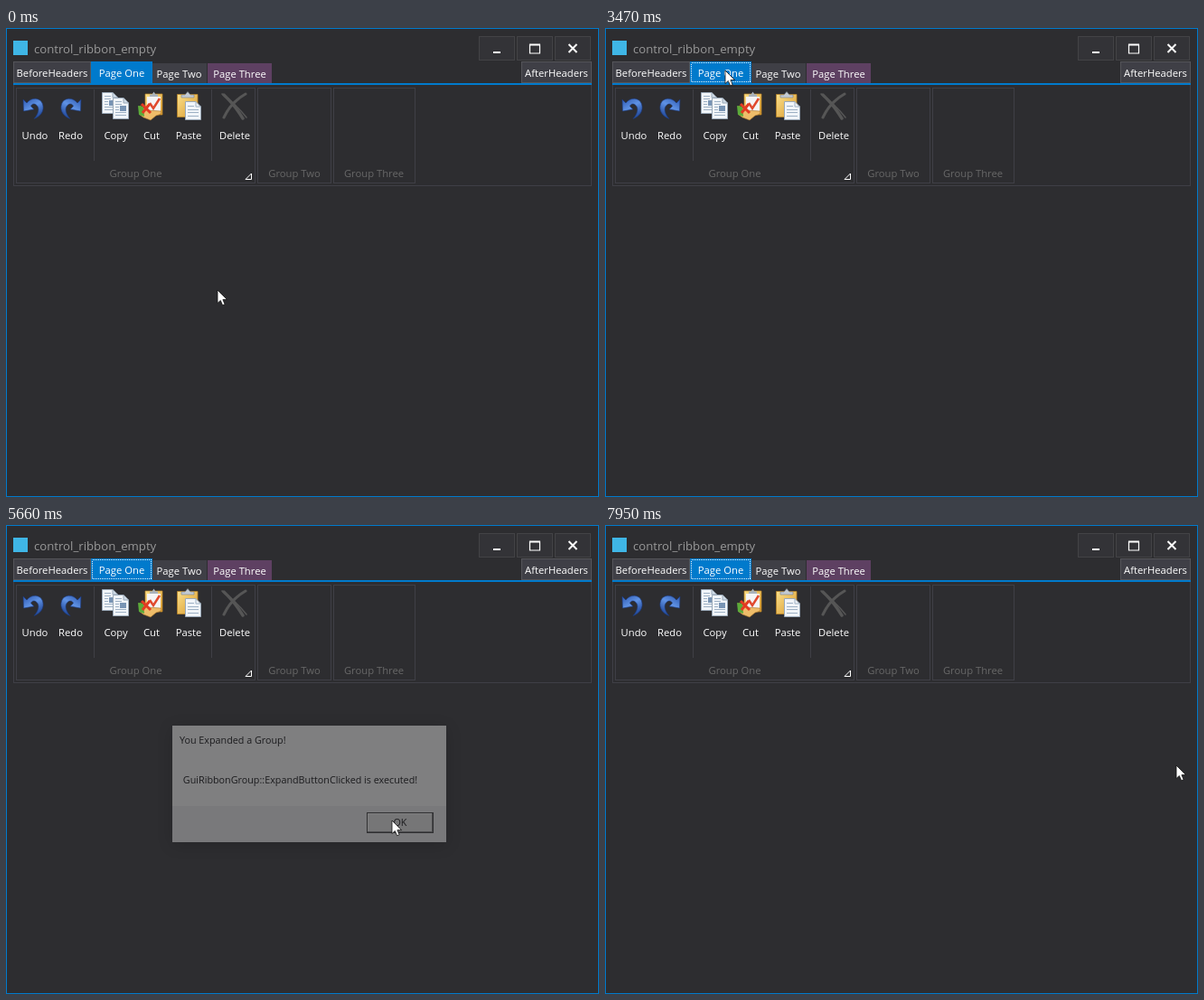
Recreate the animation shown at these times as an HTML page. Size 656 by 519 pixels, loop 7.99 s.

```html
<!DOCTYPE html>
<html lang="en">
<head>
<meta charset="utf-8">
<title>Ribbon demo</title>
<style>
html, body { margin: 0; width: 100%; height: 100%; overflow: hidden; background: #2d2d30; }
svg { display: block; font: 11.25px "Open Sans", "Noto Sans", sans-serif; }
rect { shape-rendering: crispEdges; }
text { fill: #fff; }
.mid { text-anchor: middle; }
.frame { fill: none; stroke: #007acc; }
.box { fill: none; stroke: #3f3f46; }
.btn { fill: #3f3f46; stroke: #55555a; }
.sys { fill: #333337; stroke: #434346; }
.glyph { fill: none; stroke: #fff; stroke-width: 2; }
.dots { fill: none; stroke: #e8f2fa; stroke-dasharray: 1 1; }
.title { fill: #999; font-size: 13.2px; }
.group { fill: #686868; }
.hot { fill: #54545c; }
.press { fill: #007acc; }
.cross { fill: none; stroke: #565656; stroke-linecap: round; }
.off .frame { stroke: #3f3f46; }
.off .btn, .off .sys { fill: #2d2d30; stroke: #3f3f46; }
.off .label { fill: #848484; }
.off .group { fill: #999; }
.off .glyph { stroke: #999; }
.off .icons { filter: grayscale(1) brightness(1.5) opacity(.85); }
.off .cross { stroke: #909090; }
#dialog { transform-origin: 335.5px 287px; }
#dialog text { fill: #000; font-size: 11px; }
#shade { filter: drop-shadow(0 3px 9px rgba(0, 0, 0, .4)); }
</style>
</head>
<body>
<svg id="stage" width="656" height="519" viewBox="0 0 656 519">
  <defs>
    <linearGradient id="blue" x1="0" y1="0" x2=".6" y2="1">
      <stop offset="0" stop-color="#2b55ad"/><stop offset=".5" stop-color="#5f92e4"/><stop offset="1" stop-color="#234a9c"/>
    </linearGradient>
    <linearGradient id="gold" x1="0" y1="0" x2="1" y2="1">
      <stop offset="0" stop-color="#fbe08a"/><stop offset="1" stop-color="#d99a2e"/>
    </linearGradient>
    <path id="turn" fill="url(#blue)" stroke="#1c3a7c" stroke-width=".6"
      d="M1 4L5 8C10 1 20 2 22.5 9C25 17 20 23 13 25.500C18 20 19.500 14 16 10.500C13 8 10.500 9 9.500 11.500L13 15L1.500 17Z"/>
    <g id="page">
      <path d="M.5 .5H12L17.500 6V23.500H.5Z" fill="#f1f5f9" stroke="#9aa9b8"/>
      <path d="M12 .5V6H17.500" fill="#cfdbe6" stroke="#9aa9b8"/>
      <path d="M3 4.500H10M3 7.500H10M3 10.500H7M3 13.500H7M3 16.500H15M3 19.500H15" stroke="#9db0c4"/>
      <rect x="8" y="9" width="7" height="6" fill="#7894b4"/>
    </g>
  </defs>

  <rect width="656" height="519" fill="#2d2d30"/>
  <rect class="frame" x=".5" y=".5" width="655" height="518"/>
  <rect x="8" y="14" width="16" height="16" fill="#3fb6e6"/>
  <text class="title" x="31" y="28">control_ribbon_empty</text>
  <rect class="sys" x="523.5" y="9.5" width="39" height="26"/>
  <rect class="sys" x="565.5" y="9.5" width="39" height="26"/>
  <rect class="sys" x="607.5" y="9.5" width="39" height="26"/>
  <path class="glyph" d="M539 27H547"/>
  <path class="glyph" style="stroke-width:1.200" d="M579.500 18V28H590.500V18M579 19H591M579 18H591"/>
  <path class="glyph" d="M622.500 18L631.500 27M631.500 18L622.500 27"/>

  <rect class="box" x="8.5" y="61.5" width="639" height="113"/>
  <g id="content">
    <rect class="box" x="11.5" y="66.5" width="264" height="105"/>
    <rect class="box" x="278.5" y="66.5" width="81" height="105"/>
    <rect class="box" x="362.5" y="66.5" width="90" height="105"/>
    <path class="box" d="M97.500 68V147M227.500 68V147"/>
    <text class="group mid" x="143.5" y="165">Group One</text>
    <text class="group mid" x="319" y="165">Group Two</text>
    <text class="group mid" x="407" y="165">Group Three</text>
    <g id="tools"></g>
    <path class="glyph" style="stroke-width:1" d="M265 167.500H271.500V161Z"/>
    <g class="icons">
      <use href="#turn" x="18" y="75"/>
      <use href="#turn" transform="translate(84 75) scale(-1 1)"/>
      <use href="#page" x="106" y="71"/>
      <use href="#page" x="118" y="77"/>
      <g>
        <path d="M154 73H173V96H154Z" fill="url(#gold)" stroke="#b98428" stroke-width=".7"/>
        <path d="M156 76H171V94H156Z" fill="#f4f4f6"/>
        <path d="M159 76V73.500H161.500L163.500 70.500L165.500 73.500H168V76Z" fill="#a9b2bc"/>
        <path d="M159 83L163 89L170 78" fill="none" stroke="#e0492e" stroke-width="2.500"/>
        <path d="M148 86L156 91L171 92Q174 95 166 97L160 102L152 99L148 96Z" fill="#eebd6a" stroke="#a8742a" stroke-width=".6"/>
        <path d="M146 86L152 87L153 98L147 96Z" fill="#5cab3a"/>
        <path d="M150 84L160 94M159 84L151 94" stroke="#e23b22" stroke-width="3"/>
      </g>
      <g>
        <path d="M189.500 73.500H212V98.500H189.500Z" fill="url(#gold)" stroke="#b98428" stroke-width=".8"/>
        <path d="M194 77V74H198L201 70.500L204 74H208V77Z" fill="#c3cad2" stroke="#78828c" stroke-width=".6"/>
        <path d="M198.500 81.500H210L215.500 87V101.500H198.500Z" fill="#f1f5f9" stroke="#9aa9b8"/>
        <path d="M210 81.500V87H215.500M201 86.500H208M201 90.500H213M201 93.500H213M201 97.500H213" fill="none" stroke="#9db0c4"/>
      </g>
      <path class="cross" stroke-width="3.4" d="M241 74Q252 84 262 100"/>
      <path class="cross" stroke-width="3" d="M265 73Q249 82 241 99"/>
      <path class="cross" stroke-width="1.6" d="M239 73Q256 86 266 99"/>
    </g>
  </g>
  <g id="ends"></g>
  <g id="tabs"></g>
  <rect id="line" x="8" y="61" width="640" height="2"/>

  <g id="dialog">
    <g id="shade"><rect x="181" y="221" width="309" height="131" fill="#fff"/></g>
    <rect x="181" y="311" width="309" height="41" fill="#f0f0f0"/>
    <text x="189" y="241">You Expanded a Group!</text>
    <path id="shut" d="M470 230L480 240M480 230L470 240" stroke="#000"/>
    <text x="193" y="286">GuiRibbonGroup::ExpandButtonClicked is executed!</text>
    <rect x="400" y="319" width="76" height="23" fill="#333"/>
    <rect x="401" y="320" width="74" height="21" fill="#777"/>
    <rect x="401" y="320" width="73" height="20" fill="#fff"/>
    <rect x="402" y="321" width="72" height="19" fill="#e8e8e8"/>
    <text class="mid" x="438" y="334">OK</text>
  </g>
  <path id="cursor" fill="#fff" stroke="#111" stroke-width=".8"
    d="M0 0V14.500L3.300 11.500L5.600 16.800L8.100 15.700L5.900 10.600H10.600Z"/>
</svg>
<script>
const LOOP = 7990;
const $ = id => document.getElementById(id);

// time, x, y of the pointer tip
const track = [
  [0, 234, 290], [110, 234, 290], [480, 58, 50], [820, 58, 50], [920, 134, 57],
  [1060, 350, 83], [1240, 595, 52], [1740, 595, 52], [2080, 185, 50], [2240, 185, 50],
  [2340, 204, 48], [2480, 252, 52], [2860, 252, 52], [3110, 133, 47], [3740, 133, 47],
  [4080, 210, 118], [4300, 255, 158], [4460, 268, 164], [4850, 268, 164], [5380, 427, 327],
  [5710, 427, 327], [6180, 30, 116], [6470, 36, 112], [6610, 120, 112], [6850, 120, 112],
  [7030, 252, 112], [7240, 252, 112], [7500, 410, 188], [7760, 596, 271], [7950, 632, 266], [LOOP, 632, 266]
];

const clamp = v => Math.max(0, Math.min(1, v));
const ramp = (t, a, b) => clamp((t - a) / (b - a));
const within = (t, a, b) => t >= a && t < b;

// Monotone cubic interpolation: rests stay still, passing points stay smooth.
const slope = (i, k) => (track[i + 1][k] - track[i][k]) / (track[i + 1][0] - track[i][0]);
function tangent(i, k) {
  if (!i || i === track.length - 1) return 0;
  const a = slope(i - 1, k), b = slope(i, k);
  return a * b <= 0 ? 0 : 2 * a * b / (a + b);
}
function pointer(t) {
  let i = 0;
  while (i < track.length - 2 && t >= track[i + 1][0]) i++;
  const p = track[i], q = track[i + 1], h = q[0] - p[0], u = (t - p[0]) / h;
  return [1, 2].map(k =>
    p[k] * (1 + 2 * u) * (1 - u) ** 2 + q[k] * u * u * (3 - 2 * u) +
    h * (tangent(i, k) * u * (1 - u) ** 2 - tangent(i + 1, k) * u * u * (1 - u)));
}

const disabled = t => within(t, 4580, 5600);

// Share of the last 100 ms the pointer spent inside: a fading highlight.
function heat(t, { x, y, w, h }) {
  if (disabled(t)) return 0;
  let n = 0;
  for (let k = 0; k < 6; k++) {
    const [px, py] = pointer(Math.max(0, t - k * 20));
    if (px >= x && px < x + w && py >= y && py < y + h) n++;
  }
  return n / 6;
}

const rect = (cls, { x, y, w, h }, inset = 0) =>
  `<rect class="${cls}" x="${x + inset}" y="${y + inset}" width="${w - 2 * inset}" height="${h - 2 * inset}"/>`;
const label = (x, y, s) => `<text class="label mid" x="${x}" y="${y}">${s}</text>`;

function add(parent, html) {
  const g = document.createElementNS("http://www.w3.org/2000/svg", "g");
  g.innerHTML = html;
  $(parent).append(g);
  return cls => g.querySelector("." + cls);
}

const tools = [
  ["Undo", 13, 38, 32], ["Redo", 53, 37, 71.5], ["Copy", 103, 38, 121.5],
  ["Cut", 144, 34, 161], ["Paste", 183, 38, 202], ["Delete", 233, 41, 253], ["", 262, 13, 0]
].map(([name, x, w, cx]) => {
  const box = name ? { x, y: 68, w, h: 79 } : { x, y: 158, w, h: 13 };
  return { box, part: add("tools", rect("hot", box) + label(cx, 123, name)) };
});

const ends = [["BeforeHeaders", 8, 86, 710, 1460], ["AfterHeaders", 570, 78, 1460, 2180]].map(([name, x, w, from, to]) => {
  const box = { x, y: 37, w, h: 24 };
  return { box, from, to, part: add("ends", rect("btn", box, .5) + rect("hot", box, 1) + rect("press", box, 1) +
    rect("dots", box, 1.5) + label(x + w / 2, 54, name)) };
});

const tabs = [["Page One", 96, 64, 94, 68, 128], ["Page Two", 162, 60, 158, 67, 191.5], ["Page Three", 223, 71, 222, 75, 258.5]]
  .map(([name, x, w, bx, bw, cx], i) => {
    const box = { x, y: 39, w, h: 22 }, big = { x: bx, y: 37, w: bw, h: 24 };
    return { box, purple: i === 2, part: add("tabs", rect("plain", box) + rect("hover", box) + rect("big", big) +
      rect("dots", big, 1.5) + label(cx, 55, name)) };
  });
for (const { purple, part } of tabs) {
  part("plain").style.fill = purple ? "#5e4062" : "#3f3f46";
  part("hover").style.fill = purple ? "#7a567f" : "#1c97ea";
  part("big").style.fill = purple ? "#6a4370" : "#007acc";
}

const show = (el, on) => { el.style.opacity = +on; };

function draw(t) {
  const off = disabled(t);
  const sel = within(t, 2180, 2800) ? 1 : within(t, 2800, 3470) ? 2 : 0;
  $("stage").classList.toggle("off", off);
  $("content").style.display = sel ? "none" : "";
  $("line").style.fill = sel === 2 ? "#6a4370" : "#007acc";

  for (const { box, part } of tools) show(part("hot"), heat(t, box));
  for (const { box, from, to, part } of ends) {
    show(part("hot"), heat(t, box));
    show(part("press"), ramp(t, from, from + 40) * (1 - ramp(t, from + 80, from + 140)));
    show(part("dots"), within(t, from, to));
  }
  tabs.forEach(({ box, part }, i) => {
    const on = i === sel;
    show(part("plain"), !on);
    show(part("hover"), on ? 0 : heat(t, box));
    show(part("big"), on);
    show(part("dots"), on && t >= 2180);
    part("label").setAttribute("y", on ? 54 : 55);
  });

  const opening = ramp(t, 4608, 4800), closing = ramp(t, 5600, 5700);
  const grow = 1 - (1 - opening) ** 2;
  $("dialog").style.opacity = opening * (1 - closing);
  $("dialog").style.transform = `scale(${.953 + .047 * grow - .033 * closing})`;
  show($("shut"), t < 5600);

  const [x, y] = pointer(t);
  $("cursor").setAttribute("transform", `translate(${Math.round(x)} ${Math.round(y)})`);
}

const start = performance.now();
function tick() {
  draw((performance.now() - start) % LOOP);
  requestAnimationFrame(tick);
}
tick();
</script>
</body>
</html>
```
